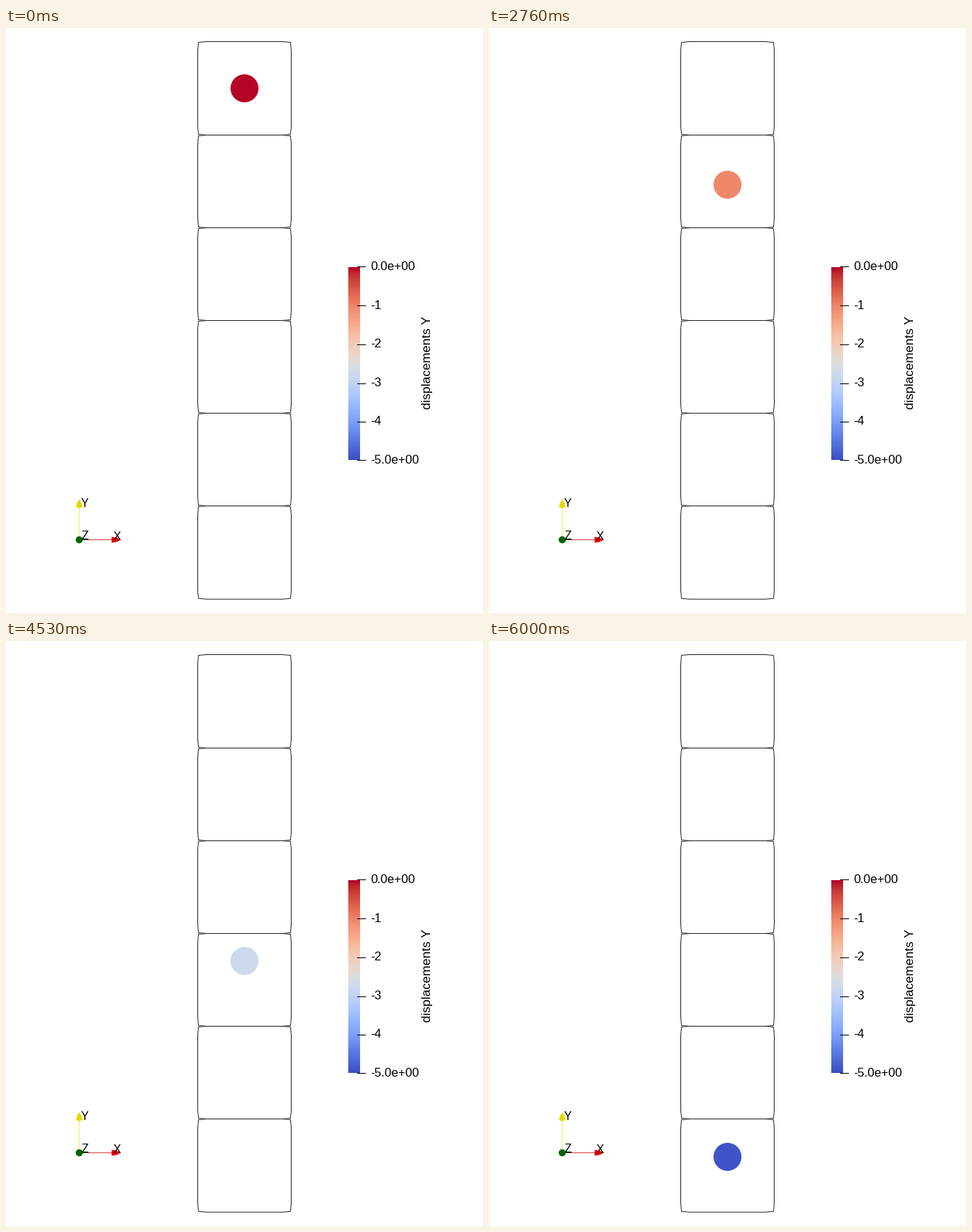
A matplotlib script for the animation above (6030 ms loop, 648 by 795 pixels).

```python
import matplotlib.pyplot as plt
import numpy as np
from matplotlib.animation import FuncAnimation
from matplotlib.patches import Circle, Polygon

W, H, DPI = 648, 795, 64
PX = 72 / DPI                      # one pixel in points
FRAMES, STEP = 201, 30
CELL, GRAVITY = 126.2, 9.81
LEFT, RIGHT, TOP, BOTTOM = 260.5, 387.5, 18.5, 776.2

fig = plt.figure(figsize=(W / DPI, H / DPI), dpi=DPI, facecolor="white")
ax = fig.add_axes([0, 0, 1, 1])
ax.axis("off")
cmap = plt.get_cmap("coolwarm")


def line(x, y, color="black", width=1.0, z=3):
    ax.plot(x, y, color=color, lw=width * PX, solid_capstyle="butt",
            snap=False, zorder=z)


def label(x, y, text, size=16.6, **kw):
    ax.text(x, y, text, family="Liberation Sans", fontsize=size * PX,
            color="black", zorder=6, **kw)


def shape(points, color):
    ax.add_patch(Polygon(points, fc=color, ec="none", zorder=4))


def cell(top, bottom, bend=12, dent=1.0):
    """Outline of a square whose edges bend inwards near the corners."""
    points = []
    for x, y, sx, sy in ((LEFT, top, 1, 1), (RIGHT, top, -1, 1),
                         (RIGHT, bottom, -1, -1), (LEFT, bottom, 1, -1)):
        corner = [(x, y + bend * sy), (x + dent * sx, y + dent * sy),
                  (x + bend * sx, y)]
        points += corner if sx == sy else corner[::-1]
    ax.add_patch(Polygon(points, fc="none", ec="#262626", lw=PX,
                         joinstyle="round", snap=False, zorder=3))


# Column of cells, drawn over the ball
edges = [TOP, *(145.5 + 126 * i for i in range(5)), BOTTOM]
for top, bottom in zip(edges, edges[1:]):
    cell(top, bottom)

# Colour legend
ax.imshow(np.linspace(1, 0, 256)[:, None], cmap=cmap, vmin=0, vmax=1,
          extent=(465, 481, 587, 325), aspect="auto",
          interpolation="nearest", zorder=2)
ticks = {324.5: "0.0e+00", 377.5: "-1", 430.5: "-2",
         483.5: "-3", 535.5: "-4", 587.5: "-5.0e+00"}
for i, (y, text) in enumerate(ticks.items()):
    line([477, 489], [y, y])
    label(495, 329.3 + 52.5 * i, text, va="baseline")
label(572.5, 454.5, "displacements Y", 17.2, rotation=90,
      ha="center", va="center")

# Orientation axes
line([99.5, 99.5], [651, 692], "#ecec70")
line([103, 114], [695.5, 695.5], "#6a3a34")
line([113, 145], [695.5, 695.5], "#e04040")
shape([(95, 651), (96.5, 645), (99.5, 640.5), (102.5, 645), (104, 651),
       (99.5, 652.5)], "#e2da00")
shape([(143.5, 691.5), (143.5, 699.5), (150, 698.5), (156, 695.5),
       (150, 692.5)], "#e00000")
ax.add_patch(Circle((99.5, 695.5), 4.8, fc="#006400", ec="none", zorder=5))
for x, y, text in ((107, 651, "Y"), (151, 695.6, "X"), (107.5, 694.6, "Z")):
    label(x, y, text, 15.5, ha="center", va="baseline")

ball = ax.add_patch(Circle((324, 82), 19, ec="none", zorder=2))
ax.set(xlim=(0, W), ylim=(H, 0))


def draw(frame):
    t = frame / (FRAMES - 1)
    drop = GRAVITY * t * t / 2
    ball.center = (324, 82 + CELL * drop)
    ball.set_facecolor(cmap(1 - drop / 5))
    return [ball]


anim = FuncAnimation(fig, draw, frames=FRAMES, interval=STEP,
                     repeat=True, repeat_delay=0)
plt.show()
```
